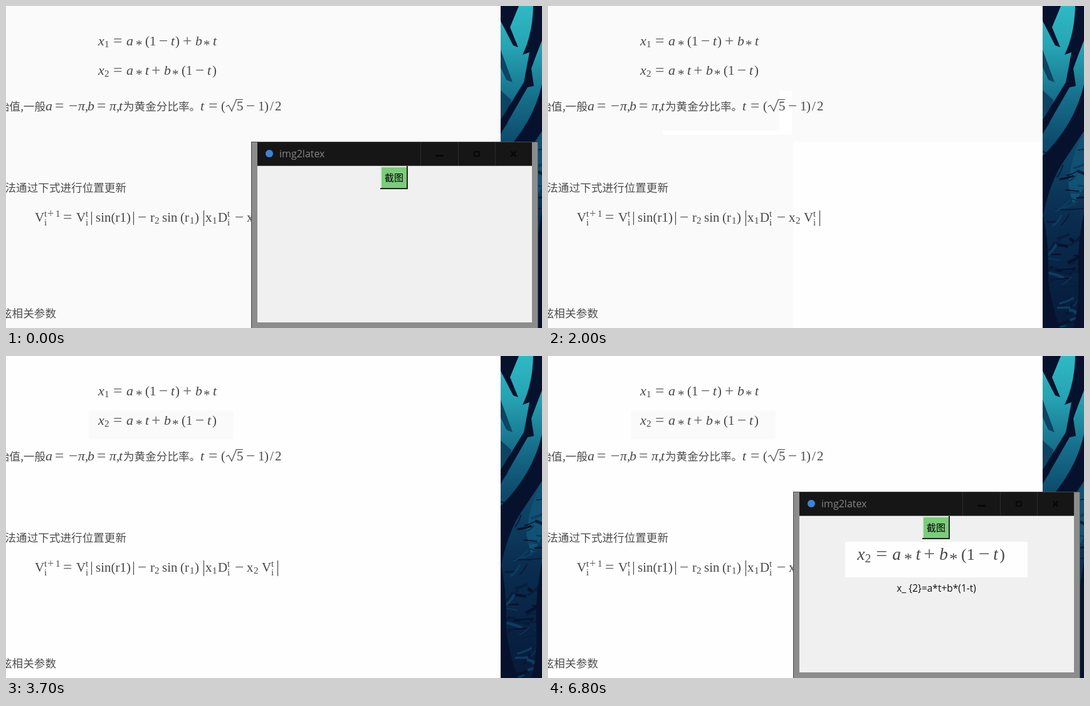
Write an HTML page that moves like this. It is 855 px wide and 515 px high and loops after 6.9 s.

```html
<!DOCTYPE html>
<html lang="zh">
<head>
<meta charset="utf-8">
<title>img2latex</title>
<style>
html, body { margin: 0; width: 100%; height: 100%; overflow: hidden; background: #fafafa; }
svg { display: block; }
.math { font-family: "Liberation Serif", serif; fill: #484848; }
.cjk { font: 17.6px "Noto Sans CJK SC", "Noto Sans CJK", sans-serif; fill: #4d4d4d; }
.ui { font-family: "Open Sans", sans-serif; }
</style>
</head>
<body>
<svg id="stage" width="855" height="515" viewBox="0 0 855 515">
  <defs>
    <linearGradient id="sky" x2="0" y2="1">
      <stop offset="0" stop-color="#2fb9c5"/>
      <stop offset=".13" stop-color="#26a3b2"/>
      <stop offset=".28" stop-color="#16708c"/>
      <stop offset=".42" stop-color="#0e4b6c"/>
      <stop offset=".65" stop-color="#0a2d50"/>
      <stop offset="1" stop-color="#071a39"/>
    </linearGradient>
    <linearGradient id="bar" x2="0" y2="1">
      <stop offset="0" stop-color="#f1f8fe"/>
      <stop offset=".5" stop-color="#dcecfb"/>
      <stop offset="1" stop-color="#c5def4"/>
    </linearGradient>
    <clipPath id="wood"><rect x="789" width="66" height="515"/></clipPath>
    <clipPath id="lens"><rect x="134" width="83" height="71"/></clipPath>
  </defs>

  <g id="scene">
    <rect id="paper" width="789" height="515"/>
    <g id="traces">
      <rect x="391" y="217" width="398" height="298" fill="#fefefe"/>
      <path id="strip" d="M369 136H389V206H183V199H369Z" fill="#fff"/>
    </g>
    <rect id="patch" x="132" y="87" width="231" height="46" fill="#fafafa"/>
    <g id="doc"></g>
    <g id="forest" clip-path="url(#wood)">
      <rect x="789" width="66" height="515" fill="url(#sky)"/>
      <path d="M789 70L808 122L798 118L789 98ZM789 135L806 150L800 190L789 200Z" fill="#0d4463"/>
      <path d="M855 205Q836 230 830 285L838 320L855 290Z" fill="#0f5273"/>
      <g id="twigs" fill="none"></g>
      <path d="M789 0H818L804 34L817 66L809 63L789 24Z
        M841 0H855V55Q845 80 838 100L842 128L832 130L789 205V182L826 122L835 74L824 78Q840 45 841 0Z
        M855 125Q840 190 789 240V340Q800 280 825 245Q845 215 855 200Z
        M789 330Q800 380 798 440Q804 480 816 515H789ZM855 330Q844 380 846 430Q848 480 838 515H855Z" fill="#06122d"/>
    </g>
    <g id="shot">
      <path id="dim" fill-opacity=".264" fill-rule="evenodd"/>
      <path id="edge" fill="none" stroke="#2f4f9f"/>
      <path id="grips" fill="#33559f"/>
      <g id="tools">
        <rect x="41.5" y="143.5" width="323" height="34" rx="2" fill="url(#bar)" stroke="#8db6dc"/>
        <rect x="52" y="151" width="19" height="16" fill="#e6f1fb" stroke="#5b86b8" stroke-width="1.5"/>
        <ellipse cx="94" cy="159.5" rx="10" ry="8" fill="#e6f1fb" stroke="#5b86b8" stroke-width="1.5"/>
        <path d="M119 168L133 155" stroke="#1b62a8" stroke-width="3"/>
        <path d="M138 150L136 161L127 152Z" fill="#1b62a8"/>
        <path d="M150 161L158 154L166 162L159 171L156 167L153 168Z" fill="#f0a437" stroke="#b96f1d"/>
        <path d="M159 153L166 149L171 153L166 161Z" fill="#e5863a" stroke="#a8561d"/>
        <text x="193" y="168" text-anchor="middle" font-family="Liberation Serif, serif" font-weight="bold" font-size="26" fill="#2460a8">A</text>
        <path d="M213.5 152V168M289.5 152V168" stroke="#9dbfe0"/>
        <path d="M226 153V165H238L234 161Q239 156 241 160Q242 164 238 169Q248 163 245 155Q240 148 230 157Z" fill="#5fb32c" stroke="#3c8419"/>
        <rect x="260" y="150" width="19" height="19" rx="2" fill="#7fa5d6" stroke="#4c74ac"/>
        <path d="M263 151H276V159H263ZM264 163H275V169H264Z" fill="#f3f7fc"/>
        <path d="M304 153L318 167M318 153L304 167" stroke="#d9662b" stroke-width="5"/>
        <rect x="330.5" y="146.5" width="29" height="27" rx="2" fill="#d5e5f8" stroke="#88a9d8"/>
        <path d="M336 159L342 165L354 153" fill="none" stroke="#4a9a1c" stroke-width="6"/>
        <path d="M337 159L342 164L353 153" fill="none" stroke="#86d13c" stroke-width="3.5"/>
      </g>
    </g>
  </g>

  <g id="info">
    <rect x="131" width="275" height="73" fill-opacity=".51"/>
    <g clip-path="url(#lens)">
      <use id="zoom" href="#scene"/>
      <path d="M175.5 0V71M134 29.5H217" stroke="#2f2aa8" stroke-width="3"/>
      <path id="pale" d="M175.5 0V27M134 29.5H173" stroke="#bfd098" stroke-width="3"/>
    </g>
  </g>
  <rect id="tip" width="206" height="70" fill-opacity=".5"/>

  <g id="win">
    <rect id="frame" x="391.5" y="217.5" width="457" height="310" stroke="#4a4a4a"/>
    <rect x="401" y="218" width="438" height="38" fill="#161616"/>
    <rect id="hover" x="662" y="218" width="59" height="37" fill="#242424"/>
    <rect id="close" x="781" y="218" width="58" height="37" fill="#c35b54"/>
    <path d="M661.5 218V255M721.5 218V255M780.5 218V255" stroke="#2d2d2d"/>
    <path d="M401 255.5H839" stroke="#6b525c"/>
    <circle cx="420" cy="236" r="6" fill="#3f83d6"/>
    <text id="title" class="ui" x="436" y="242" font-size="16">img2latex</text>
    <g id="signs" fill="none" stroke="#000">
      <path d="M685 239.5H698" stroke-width="3"/>
      <rect x="747" y="233" width="8" height="7" stroke-width="2"/>
      <path d="M805.5 232.5L813.5 240.5M813.5 232.5L805.5 240.5" stroke-width="2.5"/>
    </g>
    <rect x="401" y="256" width="438" height="250" fill="#f0f0f0"/>
    <rect x="597" y="256" width="44" height="37" fill="#7ccc7c"/>
    <path id="light" d="M598 293V257H641" fill="none" stroke-width="2"/>
    <path id="shade" d="M597 292H640V256" fill="none" stroke-width="2"/>
    <text x="619" y="279.5" text-anchor="middle" font-family="Noto Sans CJK SC, sans-serif" font-size="15">截图</text>
    <g id="result">
      <rect x="474" y="297" width="291" height="57" fill="#fefefe"/>
      <use href="#eq2" transform="translate(474 297) scale(1.247) translate(-131.6 -86.6)"/>
      <text class="ui" x="619.5" y="377" text-anchor="middle" font-size="15.5" fill="#111">x_ {2}=a*t+b*(1-t)</text>
    </g>
  </g>
</svg>
<script>
const $ = id => document.getElementById(id);
const LOOP = 6900, STEP = 100;

// Tokens are "x:glyphs"; _ and ^ mark scripts.
function row(id, base, spec, upright) {
  const parts = spec.split(' ').map(tok => {
    const [, x, mark, s] = tok.match(/^(\d+):([_^]?)(.+)$/);
    const op = /^[=+−]$/.test(s);
    const slant = !upright && /^[a-zπ]$/.test(s);
    const size = (slant ? 22 : 21) * (mark ? .72 : 1) * (op ? 1.22 : 1);
    const shift = { _: s == 'i' ? 6 : 3, '^': -8, '': 0 }[mark];
    const dy = shift + (op ? 1 : 0) + (s == '*' ? 5.5 : 0);
    const look = (slant ? ' font-style="italic"' : '') + (op ? ' fill="#606060"' : '');
    return `<text x="${x}" y="${base + dy}" font-size="${size}"${look}>${s}</text>`;
  });
  return `<g id="${id}" class="math">${parts.join('')}</g>`;
}
const cjk = (x, y, s) => `<text class="cjk" x="${x}" y="${y}">${s}</text>`;

$('doc').innerHTML =
  row('eq1', 63, '147:x 157:_1 171:= 192:a 207:* 222:( 229:1 244:− 263:t 270:) 282:+ 302:b 315:* 330:t') +
  row('eq2', 110, '147:x 157:_2 171:= 192:a 207:* 222:t 232:+ 252:b 265:* 280:( 287:1 302:− 321:t 329:)') +
  cjk(-12.3, 167, '始值,一般') + cjk(187, 167, '为黄金分比率。') +
  row('eq3', 167, '63:a 78:= 100:− 115:π 126:, 130:b 145:= 165:π 176:, 180:t 310:t 323:= 343:( 368:5 383:− 402:1 412:) 421:/ 429:2') +
  '<path d="M351 161L355 158.5L360 168L367.5 149.5H378" fill="none" stroke="#484848" stroke-width="1.2"/>' +
  cjk(-1.5, 297, '法通过下式进行位置更新') +
  row('eq4', 345, '46:V 61:^t 66:^+ 79:^1 61:_i 91:= 112:V 127:^t 127:_i 143:sin(r1) 210:− 230:r 237:_2 249:sin 278:( 285:r 293:_1 301:) 318:x 329:_1 338:D 353:^t 353:_i 365:− 384:x 395:_2 408:V 423:^t 423:_i', true) +
  '<path d="M136.5 329V350M203.5 329V350M315.5 327V352M433.5 327V352" stroke="#484848" stroke-width="1.2"/>' +
  cjk(-8, 497.5, '弦相关参数');

let seed = 7;
const rnd = () => (seed = seed * 16807 % 2147483647) / 2147483647;
let twigs = '';
for (let i = 0; i < 70; i++) {
  const x = 785 + rnd() * 66, y = 230 + rnd() * 285, dx = 8 + rnd() * 24, dy = 10 - rnd() * 30;
  const tone = ['#06122d', '#0d3c5f', '#081d3c'][i % 3];
  twigs += `<path d="M${x} ${y}q${dx / 2} ${dy / 4} ${dx} ${dy}" stroke="${tone}" stroke-width="${1 + rnd() * 4}"/>`;
}
$('twigs').innerHTML = twigs;

// Keyed tables: the last entry at or before t holds.
const at = (table, t) => table.reduce((v, k) => k[0] <= t ? k : v, table[0]);
const tips = [[900, 560, 150], [1000, 424, 9], [1100, 300, 90], [1200, 216, 149], [1300, 183, 136], [1400, 163, 129],
  [1500, 150, 128], [1600, 141, 127], [1700, 135, 126], [1800, 132, 126], [1900, 131, 126]];
const corners = [[2100, 180, 96], [2200, 250, 112], [2300, 320, 126], [2400, 355, 132], [2500, 364, 133]];
const cursor = [[2500, 365, 133], [3000, 363, 140], [3100, 359, 151], [3200, 357, 157], [3400, 356, 160]];
const fades = [[0, 1], [800, .5], [900, 0], [3800, .4], [3900, .8], [4000, 1]];

const show = (id, on) => $(id).style.display = on ? '' : 'none';
const set = (id, name, value) => $(id).setAttribute(name, value);

function select(x, y) {
  const box = `M131.5 86.5H${x + .5}V${y + .5}H131.5Z`;
  set('dim', 'd', 'M0 0H855V515H0Z' + box);
  set('edge', 'd', box);
  const mx = Math.round((131 + x) / 2), my = Math.round((86 + y) / 2);
  let d = '';
  for (const gx of [131, mx, x]) for (const gy of [86, my, y])
    if (gx != mx || gy != my) d += `M${gx - 2} ${gy - 2}h5v5h-5Z`;
  set('grips', 'd', d);
}

function draw(t) {
  const shot = t >= 2100 && t < 3700;
  const tip = t >= 900 && t < 2000;
  const active = t >= 700 && t < 6800;
  const pressed = t == 700;
  const alpha = at(fades, t)[1];

  set('paper', 'fill', t >= 3700 ? '#fefefe' : '#fafafa');
  show('traces', t >= 900 && t < 2100);
  show('strip', t >= 1400);
  show('patch', t >= 3700);

  show('shot', shot);
  show('info', shot);
  show('tools', t >= 2800);
  if (shot) {
    const [, x, y] = at(corners, t);
    select(x, y);
    const [, cx, cy] = t < 2500 ? [0, x + 1, y] : at(cursor, t);
    set('zoom', 'transform', `translate(175.5 29.5) scale(2) translate(${-cx} ${-cy})`);
    show('pale', t < 3000);
  }

  show('tip', tip);
  if (tip) {
    const [, x, y] = at(tips, t);
    set('tip', 'x', x);
    set('tip', 'y', y);
  }

  show('win', alpha > 0);
  set('win', 'opacity', alpha);
  set('frame', 'fill', active ? '#1a1a1a' : '#8c8c8c');
  set('title', 'fill', active ? '#fff' : '#858585');
  set('signs', 'opacity', active ? 1 : .6);
  show('close', active);
  show('hover', t == 100);
  set('light', 'stroke', pressed ? '#222' : '#d8f0d8');
  set('shade', 'stroke', pressed ? '#d8f0d8' : '#1c2a1c');
  show('result', t >= 4600);
}

const start = performance.now();
let last = -1;
function tick() {
  const t = Math.floor((performance.now() - start) % LOOP / STEP) * STEP;
  if (t != last) draw(last = t);
  requestAnimationFrame(tick);
}
tick();
</script>
</body>
</html>
```
